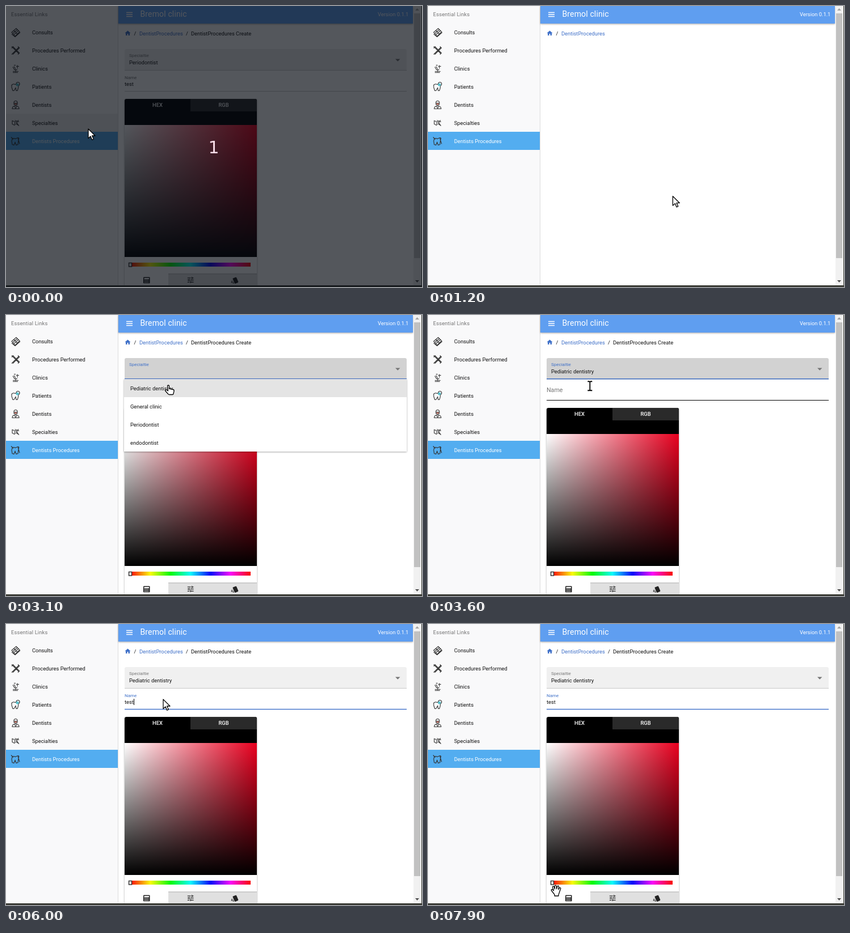
Animation of 733x496 px, one loop 8 s. Source, as an HTML page:

```html
<!DOCTYPE html>
<html lang="en">
<head>
<meta charset="utf-8">
<title>Procedure form</title>
<style>
  html, body { margin: 0; width: 100%; height: 100%; overflow: hidden; background: #fff; }
  svg { display: block; width: 733px; height: 496px; }
  text { font: 9.33px Roboto, sans-serif; fill: #111; white-space: pre; }
  .title { font-size: 14px; letter-spacing: .14px; fill: #fff; }
  .head { letter-spacing: .167px; fill: #757575; }
  .white { fill: #fff; }
  .link { fill: #3f70c8; }
  .tab { font-weight: 500; fill: #fff; text-anchor: middle; }
  .url { font: 15.2px "Open Sans", sans-serif; fill: #555; }
  .count { font: 30px "DejaVu Sans", sans-serif; fill: #f8dde8; text-anchor: middle; }
  .line { fill: none; stroke: #333; stroke-width: 1.1; }
  #cursor path { fill: #fff; stroke: #000; stroke-width: 1.3; stroke-linejoin: round; }
</style>
</head>
<body>
<svg viewBox="0 0 733 496">
  <defs>
    <linearGradient id="tint"><stop stop-color="#fff"/><stop offset="1" stop-color="#e8001f"/></linearGradient>
    <linearGradient id="shade" x2="0" y2="1"><stop stop-opacity="0"/><stop offset="1"/></linearGradient>
    <linearGradient id="hue"></linearGradient>
    <filter id="shadow" x="-10%" y="-20%" width="120%" height="150%">
      <feDropShadow dx="0" dy="1" stdDeviation="1.5" flood-opacity=".35"/>
    </filter>
  </defs>
  <rect width="733" height="496" fill="#fff"/>

  <g id="drawer">
    <rect width="197" height="496" fill="#f9f9fa"/>
    <rect x="197" width="1" height="496" fill="#dcdcdc"/>
    <text class="head" x="9" y="18">Essential Links</text>
  </g>

  <rect x="198" width="519" height="31" fill="#5e9ef0" filter="url(#shadow)"/>
  <path d="M212 11.5h11M212 15h11M212 18.5h11" stroke="#fff" stroke-width="1.3"/>
  <text class="title" x="236.500" y="19">Bremol clinic</text>
  <text class="white" x="655" y="18">Version 0.1.1</text>

  <path class="link" transform="translate(208.500 42) scale(.5)" d="M10 20v-6h4v6h5v-8h3L12 3 2 12h3v8z"/>
  <text x="225.500" y="52">/</text>
  <text class="link" x="235" y="52">DentistProcedures</text>

  <g id="form">
    <text x="317" y="52">/</text><text x="326" y="52">DentistProcedures Create</text>

    <path id="selBox" d="M209 113V79q0-3 3-3H703q3 0 3 3V113z"/>
    <rect x="209" y="113" width="497" height="1" fill="#c8c8c8"/>
    <rect id="selLine" y="112" height="1.400" fill="#3f70c8"/>
    <text id="selLabel" x="217">Specialtie</text>
    <text id="selValue" x="217" y="103"></text>
    <path d="M686 93.500h8.500l-4.250 4.250z" fill="#757575"/>

    <rect id="nameBorder" x="209" y="150" width="497" height="1"/>
    <rect id="nameLine" y="149.800" height="1.400" fill="#3f70c8"/>
    <text id="nameLabel" x="209">Name</text>
    <text id="nameValue" x="209" y="141"></text>
    <rect id="caret" y="132" width="1" height="11"/>

    <rect x="209" y="164" width="233" height="340" rx="3" fill="#fff" filter="url(#shadow)"/>
    <path d="M209 210V167q0-3 3-3H439q3 0 3 3V210z"/>
    <path d="M325 186V164H439q3 0 3 3V186z" fill="#2a2a2a"/>
    <text class="tab" x="267" y="178">HEX</text><text class="tab" x="383.500" y="178">RGB</text>
    <rect x="209" y="210" width="233" height="233" fill="url(#tint)"/>
    <rect x="209" y="210" width="233" height="233" fill="url(#shade)"/>
    <rect x="219" y="453" width="212" height="7" fill="url(#hue)"/>
    <rect x="216.500" y="453.500" width="5" height="6.500" fill="#eee" stroke="#333" stroke-width="1.400"/>
    <rect x="286" y="472" width="156" height="22" fill="#e0e0e0"/>
    <rect x="286" y="472" width="156" height="2" fill="#ccc"/>
    <g fill="#222">
      <rect x="242" y="478.500" width="11.500" height="11" rx="1"/>
      <path d="M244 483h8M244 485.500h8M244 488h8" stroke="#fff" stroke-width="1.300" stroke-dasharray="1.300"/>
      <rect x="243.500" y="480" width="8.500" height="2" fill="#fff"/>
      <path transform="translate(318 476.500) scale(.6)" d="M3 17v2h6v-2H3zM3 5v2h10V5H3zm10 16v-2h8v-2h-8v-2h-2v6h2zM7 9v2H3v2h4v2h2V9H7zm14 4v-2H11v2h10zm-6-4h2V7h4V5h-4V3h-2v6z"/>
      <path transform="translate(396 477) scale(.6)" d="M2.500 19.600l1.400.6v-9l-2.500 5.900c-.4 1 .1 2.100 1.100 2.500zM22 16L17 4c-.4-1-1.500-1.500-2.500-1.100L7.100 6c-1 .4-1.500 1.500-1.100 2.500l5 12c.4 1 1.600 1.500 2.600 1.100l7.300-3c1-.5 1.500-1.600 1.100-2.600zM5.900 19.700c0 1.100.9 2 2 2h1.400l-3.400-8.300z"/>
    </g>

    <g id="menu"><rect x="208" y="113" width="498" height="128" fill="#fff" filter="url(#shadow)"/></g>
  </g>

  <rect x="718" width="14" height="494" fill="#f1f1f1"/>
  <rect x="719" y="13" width="11" height="432" fill="#c1c1c1"/>
  <path d="M721 8h7l-3.500-4z" fill="#a3a3a3"/>
  <path d="M721 484h7l-3.500 4z" fill="#505050"/>

  <g id="status">
    <path d="M0 471H237q4 0 4 4V494H0z" fill="#dfdfdf" stroke="#ccc"/>
    <text class="url" id="url" x="3" y="487"></text>
  </g>
  <rect y="493" width="733" height="3" fill="#3b3c36"/>
  <rect x="732" width="1" height="496" fill="#3b3c36"/>

  <g id="overlay">
    <rect width="733" height="496" fill="#080c14" opacity=".69"/>
    <text class="count" x="366" y="260">1</text>
  </g>
  <g id="cursor"><path/></g>
</svg>

<script>
const LOOP = 8000;
const $ = id => document.getElementById(id);
const set = (id, attrs) => { for (const k in attrs) $(id).setAttribute(k, attrs[k]); };
const show = (id, on) => $(id).style.display = on ? '' : 'none';
const clamp = v => Math.max(0, Math.min(1, v));
const lerp = (a, b, p) => a + (b - a) * p;

// Material easing, cubic-bezier(.4, 0, .2, 1)
function material(x) {
  let lo = 0, hi = 1, s = .5;
  for (let i = 0; i < 20; i++) {
    s = (lo + hi) / 2;
    const bx = 1.2 * s * (1 - s) ** 2 + .6 * s * s * (1 - s) + s ** 3;
    if (bx < x) lo = s; else hi = s;
  }
  return s * s * (3 - 2 * s);
}
const ramp = (t, start, length = 360) => {
  const x = clamp((t - start) / length);
  return x === 0 || x === 1 ? x : material(x);
};

// Drawer rows: label and line icon centred on 0,0
const links = [
  ['Consults', 'M-7 0L1-7 7-1-1 7zM-5 2L3-5M-3 4L5-3M-3-3L3 3M-7 3L-1 8 8 0'],
  ['Procedures Performed', 'M-7-7L6 6M-5-7L7 5M-7 7L6-6M-5 7L7-5M-7-4l3-3M4 7l3-3M4-7l3 3'],
  ['Clinics', 'M-5-3l3 5h5M-3-4l3 5M-5 5H5M0 2V6M3-6v6M1-4h5M-3-6h3M-5 7H4'],
  ['Patients', 'M-7-3q3-3 6-1 3-1 5 0 2 4-1 11h-2L0 2-3 7h-2L-7 1zM1-5a3 3 0 1 1 6 0a3 3 0 1 1-6 0'],
  ['Dentists', 'M-3-4q0-3 3-3t3 3v3q-3 3-6 0zM-6 7q0-5 6-5t6 5zM-3-3h6M-2 3l2 3 2-3'],
  ['Specialties', 'M-6-4l5 2-1 6-4-2zM-1-5l6 9M5-5L0 3M1-4l5 2M2 2l4 3'],
  ['Dentists Procedures', 'M-6-4q3-2 5 0 3-1 5-2 3 0 1 4l-1 8-3 1-2-5-2 5-3-1-1-6zM-8-7l4 4M4-5l3 10']
];
$('drawer').innerHTML += links.map(([label, icon], i) => {
  const y = 46.5 + i * 32, last = i === 6;
  return `<rect id="row${i}" y="${y - 16.5}" width="197" height="32" fill="none"/>
    <path class="line" transform="translate(17 ${y})" d="${icon}"/>
    <text x="46" y="${y + 3.5}" class="${last ? 'white' : ''}">${label}</text>`;
}).join('') + '<circle cx="20" cy="139" r="2.500" fill="#59c3cf"/><path d="M15 172h4v2h-4z" fill="#d77d70"/>';

$('menu').innerHTML += '<rect x="208" y="113" width="498" height="32" fill="#e4e4e4"/>' +
  ['Pediatric dentistry', 'General clinic', 'Periodontist', 'endodontist']
    .map((s, i) => `<text x="219" y="${133 + 32 * i}">${s}</text>`).join('');

$('hue').innerHTML = [0, 60, 120, 180, 240, 300, 360]
  .map(h => `<stop offset="${h / 360}" stop-color="hsl(${h} 95% 50%)"/>`).join('');

const shapes = {
  arrow: 'M0 0V16.500l4-3.600 2.700 6.300 2.700-1.200-2.700-6H12z',
  hand: 'M-1.500 1q1.500-2 3 0v5l7 1.500q2 .5 1.500 3l-1 4.500q-.3 1.500-1.500 1.500h-6q-1 0-2-1.200l-4.500-5q-1-1.500.3-2.200 1-.4 2 .4l2.200 1.500z',
  beam: 'M-4-8h3l1 1 1-1h3M-4 8h3l1-1 1 1h3M0-7V7',
  grab: 'M-5 4l-3.500-4.500q-.8-1.800.8-2 1-.2 1.800.8l1.400 1.400-2-6q-.2-1.700 1.100-1.900 1.200-.1 1.700 1.400l1.200 3.600-.3-5q.1-1.600 1.400-1.600t1.600 1.600l.5 4.800 1-4.200q.5-1.500 1.700-1.200t1.100 1.800l-.6 4.600 1.400-2.500q.9-1.200 1.900-.6t.4 2l-2.400 7q-.5 2-1.200 3v2.500h-7v-2.300z'
};
const shapeTimes = [[0, 'arrow'], [250, 'hand'], [800, 'arrow'], [1250, 'hand'], [1550, 'arrow'],
  [2400, 'hand'], [3400, 'beam'], [5950, 'arrow'], [6150, 'hand'], [7300, 'grab']];
const path = [[100, 145, 217], [450, 110, 241], [750, 110, 241], [1350, 490, 353], [2050, 490, 353],
  [2450, 310, 100], [2600, 310, 100], [3000, 286, 124], [3500, 286, 124], [4000, 279.5, 136],
  [5900, 279.5, 136], [5950, 277, 133], [6000, 277, 133], [6500, 345, 405], [7050, 345, 405],
  [7600, 215, 465], [7850, 226, 471]];

function pointer(t) {
  const i = path.findIndex(k => k[0] > t);
  if (i === 0) return path[0].slice(1);
  if (i < 0) return path[path.length - 1].slice(1);
  const [t0, x0, y0] = path[i - 1], [t1, x1, y1] = path[i];
  const u = (t - t0) / (t1 - t0), p = u * u * (3 - 2 * u);
  return [lerp(x0, x1, p), lerp(y0, y1, p)];
}

function label(id, float, focused, restY, floatY) {
  set(id, { y: lerp(restY, floatY, float) });
  $(id).style.fontSize = lerp(10.67, 8, float) + 'px';
  $(id).style.fill = focused ? '#3f70c8' : '#757575';
}
const underline = (id, p) => set(id, { x: 457.5 - 248.5 * p, width: 497 * p });

function draw(t) {
  const before = t < 900;
  show('overlay', t < 100);
  show('form', before || t >= 1500);

  set('row5', { fill: t < 250 ? '#ebebeb' : 'none' });
  set('row6', { fill: t >= 250 && t < 800 ? '#6cb8f2' : '#53adf0' });

  const selFocus = ramp(t, 2500) - ramp(t, 4120);
  const grey = Math.round(lerp(240, 210, selFocus));
  set('selBox', { fill: `rgb(${grey},${grey},${grey})` });
  underline('selLine', selFocus);
  label('selLabel', before ? 1 : ramp(t, 2500), t >= 2500 && t < 4120, 98, 90);
  $('selValue').textContent = before ? 'Periodontist' : t >= 3350 ? 'Pediatric dentistry' : '';
  const menu = clamp((t - 2500) / 200) - clamp((t - 3350) / 200);
  show('menu', menu > 0);
  set('menu', { opacity: menu });

  underline('nameLine', before ? ramp(t, 550) : ramp(t, 4120));
  set('nameBorder', { fill: t >= 3400 && t < 6150 ? '#000' : '#c8c8c8' });
  label('nameLabel', before ? 1 : ramp(t, 4120), (before && t >= 550) || t >= 4120, 136, 128.5);
  const typed = before || t >= 5700 ? 4 : t >= 5400 ? 3 : t >= 5100 ? 1 : 0;
  $('nameValue').textContent = 'test'.slice(0, typed);
  const caretSpans = [[550, 900], [4120, 4700], [5100, 6300], [6800, 7300]];
  show('caret', caretSpans.some(([a, b]) => t >= a && t < b));
  set('caret', { x: 209 + (typed ? Math.round($('nameValue').getComputedTextLength()) : 0) });

  const status = t < 1250 ? t >= 400 && t < 850 ? 1 : 0 : 1 - clamp((t - 2100) / 200);
  set('status', { opacity: status });
  $('url').textContent = 'localhost:8081/…/' + (t < 1250 ? 'dentists-proc…' : 'create');
  $('url').style.fill = t < 1700 ? '#555' : '#777';

  const shape = shapeTimes.filter(s => s[0] <= t).pop()[1];
  set('cursor', { transform: `translate(${pointer(t)})` });
  const glyph = $('cursor').firstChild;
  glyph.setAttribute('d', shapes[shape]);
  glyph.style.strokeWidth = shape === 'beam' ? 1.8 : 1.3;
}

function frame() {
  draw(performance.now() % LOOP);
  requestAnimationFrame(frame);
}
frame();
</script>
</body>
</html>
```
